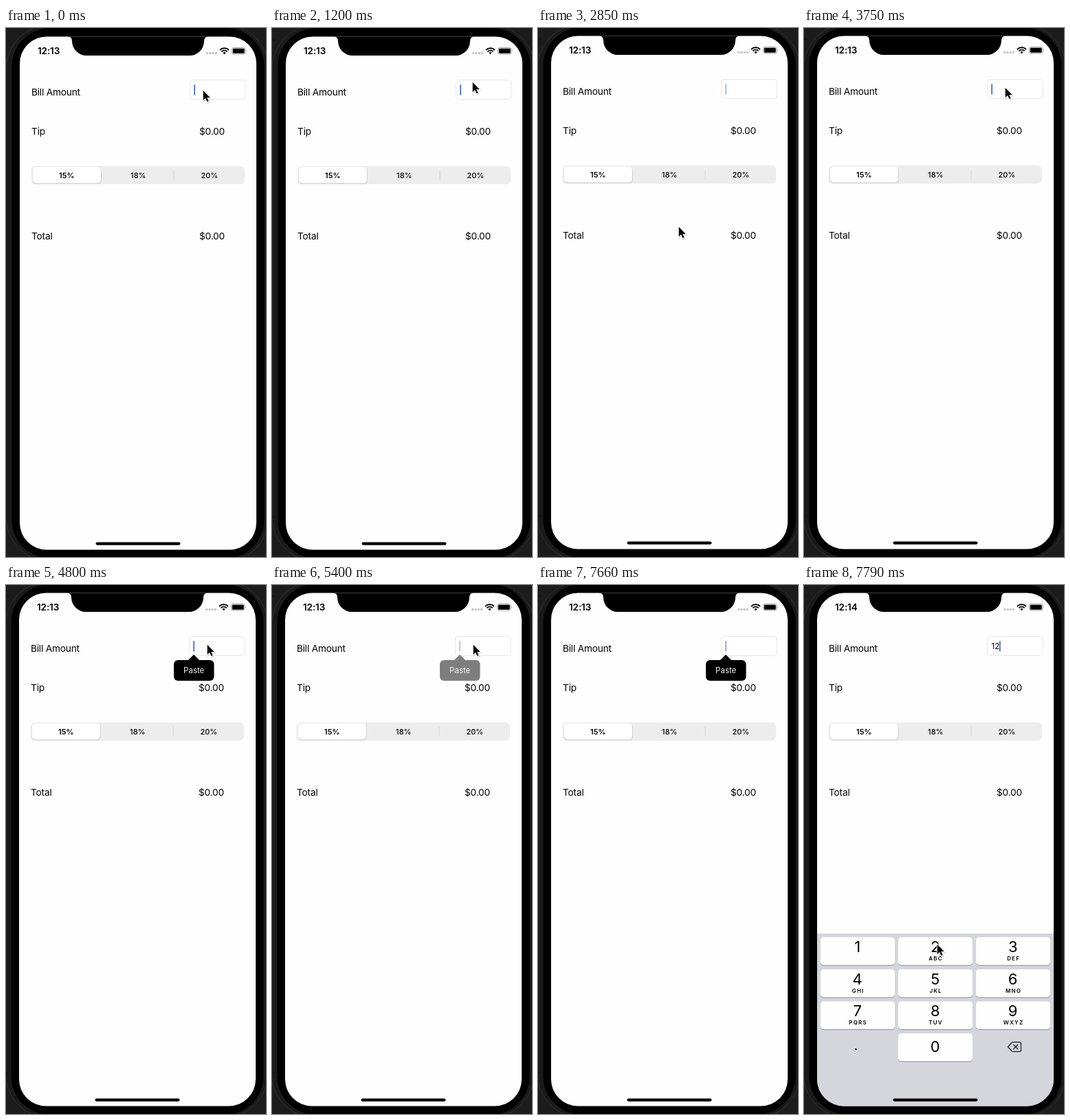
An HTML page for the animation above (8 s loop, 378 by 768 pixels).

```html
<!DOCTYPE html>
<html lang="en">
<head>
<meta charset="utf-8">
<title>Tip calculator</title>
<style>
  html, body { margin: 0; width: 100%; height: 100%; overflow: hidden; background: #1c1c1c; }
  svg { display: block; width: 378px; height: 768px; }
  text { font: 13.7px Inter, Roboto, sans-serif; letter-spacing: -.2px; }
  .mid { text-anchor: middle; }
  text.time { font-size: 13.5px; font-weight: 600; letter-spacing: -.1px; }
  text.seg { font-size: 11px; font-weight: 500; letter-spacing: 0; }
  text.small { font-size: 11.5px; letter-spacing: 0; }
  text.digit { font-size: 22px; letter-spacing: 0; }
  text.letters { font-size: 8px; font-weight: 600; letter-spacing: 1.2px; }
</style>
</head>
<body>
<svg viewBox="0 0 378 768">
  <defs>
    <clipPath id="screen"><rect x="19" y="11.5" width="344" height="745" rx="39"/></clipPath>
  </defs>
  <rect width="378" height="768" fill="#1c1c1c"/>
  <g id="phone">
    <rect x="-1" y="-6" width="382" height="780" rx="66" fill="#1a1a1a" stroke="#303030"/>
    <path d="M-1 16.500H4M-1 708.500H4" stroke="#101010"/>
    <rect x="7.500" y="-1" width="367" height="770" rx="56"/>
    <g clip-path="url(#screen)">
      <rect x="19" y="11" width="344" height="746" fill="#fefefe"/>
      <path d="M88 11q7 .5 7 7a21 21 0 0 0 21 21H266a21 21 0 0 0 21-21q0-6.500 7-7Z"/>

      <text id="clock" class="time" x="45" y="37">12:13</text>
      <path d="M290.300 35.500H306" stroke="#c6c6c8" stroke-width="3" stroke-dasharray="3 1.200"/>
      <g fill="none" stroke="#000" stroke-width="1.900">
        <path d="M310 31a9.200 9.200 0 0 1 13 0M312.300 33.400a5.900 5.900 0 0 1 8.400 0"/>
      </g>
      <path d="M316.500 37.300l-2.200-2.300a3.100 3.100 0 0 1 4.400 0Z"/>
      <rect x="327.500" y="27.500" width="19.500" height="9.500" rx="2.500" fill="none" stroke="#a0a0a0"/>
      <rect x="328.800" y="28.800" width="16.900" height="6.900" rx="1.300"/>
      <path d="M348 30.700q1.600 1.500 0 3.200Z" fill="#a0a0a0"/>

      <text x="36" y="97">Bill Amount</text>
      <text x="36" y="153.500">Tip</text>
      <text x="36" y="305.500">Total</text>
      <text x="280" y="153.500">$0.00</text>
      <text x="280" y="305.500">$0.00</text>
      <rect x="266.500" y="74.500" width="80.500" height="28" rx="4" fill="#fff" stroke="#e8e8e8"/>

      <rect x="35.500" y="199.500" width="310.500" height="26.500" rx="6.500" fill="#ededee"/>
      <rect x="37" y="201.500" width="101" height="24" rx="5.500" fill="#cfcfd0"/>
      <rect x="37.500" y="201" width="99.500" height="23.200" rx="5.300" fill="#fff"/>
      <path d="M243 206v14" stroke="#d6d6d8"/>
      <text class="seg mid" x="87.300" y="216.500" style="font-weight:600">15%</text>
      <text class="seg mid" x="191.300" y="216.500">18%</text>
      <text class="seg mid" x="294.800" y="216.500">20%</text>

      <g id="keyboard"><rect x="19" y="506" width="344" height="251" fill="#d5d6db"/></g>
      <rect x="129.500" y="745.500" width="123" height="4.200" rx="2.100"/>
    </g>
    <text id="amount" class="small" x="272.500" y="93">12</text>
    <rect id="caret" y="81" width="1.700" height="15.800" rx=".8" fill="#3f69d6"/>
    <g id="popup">
      <path d="M264.500 109.500L273 101l8.500 8.500Z"/>
      <rect x="244" y="109" width="58.500" height="30" rx="6"/>
      <text class="small mid" x="273.200" y="128" fill="#eee">Paste</text>
    </g>
  </g>
  <g id="pointer">
    <path d="M0 0V14.200l3.300-3.100 2.400 5.200 2.200-1-2.400-5.100H10Z" transform="translate(.8 1.400)" stroke="#000" stroke-width="2" opacity=".15"/>
    <path d="M0 0V14.200l3.300-3.100 2.400 5.200 2.200-1-2.400-5.100H10Z" stroke="#fff" stroke-width="1.800" paint-order="stroke"/>
  </g>
</svg>
<script>
const $ = id => document.getElementById(id);
const LOOP = 8000, STEP = 150, SHIFT = 1650, TYPED = 7790;

// Number pad
const letters = ['', 'ABC', 'DEF', 'GHI', 'JKL', 'MNO', 'PQRS', 'TUV', 'WXYZ'];
function key(col, row, digit, label, drop) {
  const x = 24 + col * 113, y = 511.3 + row * 46.6;
  return `<rect x="${x}" y="${y + 1}" width="108" height="40.500" rx="4.500" fill="#8d8e92"/>
    <rect x="${x}" y="${y}" width="108" height="40.500" rx="4.500" fill="#fefefe"/>
    <text class="digit mid" x="${x + 53.7}" y="${y + drop}">${digit}</text>
    <text class="letters mid" x="${x + 54.6}" y="${y + 33.7}">${label}</text>`;
}
$('keyboard').insertAdjacentHTML('beforeend',
  letters.map((label, i) => key(i % 3, Math.floor(i / 3), i + 1, label, 21.7)).join('') +
  key(1, 3, 0, '', 27.3) +
  `<circle cx="75.300" cy="674" r="1.300"/>
   <g fill="none" stroke="#222" stroke-width="1.300" stroke-linejoin="round" stroke-linecap="round">
     <path d="M296.500 670.500l5.500-6q.7-.8 1.700-.8H313.500q2 0 2 2v9.600q0 2-2 2H303.700q-1 0-1.700-.8Z"/>
     <path d="M304.700 667.500l6 6m0-6l-6 6"/>
   </g>`);

// Tracks: [start, value]; each value holds until the next start
const blink = t => [[t, .4], [t + 150, 0], [t + 300, .5], [t + 450, 1]];
const caretTrack = [[0, 1], ...[600, 1650, 2550].flatMap(blink),
  [4500, 0], [4800, 1], ...blink(5400),
  [6450, .4], [6600, 0], [6750, 1], [7350, 0], [7660, .65], [TYPED, 1]];
const popupTrack = [[0, 0], [4350, .5], [4500, 1], [4950, .5], [5100, 0],
  [5400, .5], [5550, 1], [TYPED, 0]];
const held = (track, t) => track.findLast(([start]) => start <= t)[1];

// Pointer strokes: [time, x, y]; the pointer is away between strokes
const strokes = [
  [[0, 286, 90], [1050, 286, 90], [1200, 291, 78], [1350, 301, 40], [1500, 311, 2], [1600, 313, -10]],
  [[2550, 310, 10], [2700, 275, 118], [2850, 204, 288], [3000, 171, 359],
   [3150, 171, 359], [3300, 180, 335], [3450, 235, 205], [3600, 284, 98], [3750, 292, 86],
   [5850, 292, 86], [6000, 298, 200], [6150, 310, 510], [6300, 319, 738], [6550, 320, 740]],
  [[TYPED, 193, 521], [LOOP, 193, 521]]
];
function pointerAt(t) {
  const path = strokes.find(s => t >= s[0][0] && t <= s.at(-1)[0]);
  if (!path) return null;
  const i = Math.max(1, path.findIndex(p => p[0] >= t));
  const [t0, x0, y0] = path[i - 1], [t1, x1, y1] = path[i];
  const k = (t - t0) / (t1 - t0);
  return [x0 + (x1 - x0) * k, y0 + (y1 - y0) * k];
}

const show = (id, on) => $(id).style.display = on ? '' : 'none';

function draw(now) {
  const t = now % LOOP, typed = t >= TYPED;
  const offset = t < SHIFT ? 1 : 0;
  $('phone').setAttribute('transform', `translate(${offset} ${offset})`);
  $('clock').textContent = typed ? '12:14' : '12:13';
  show('keyboard', typed);
  show('amount', typed);
  $('caret').setAttribute('x', typed ? 284 : 272.3);
  $('caret').setAttribute('opacity', held(caretTrack, t));
  $('popup').setAttribute('opacity', held(popupTrack, t));
  const p = pointerAt(typed ? t : Math.floor(t / STEP) * STEP);
  show('pointer', p);
  if (p) $('pointer').setAttribute('transform', `translate(${p[0] + .7} ${p[1] + .7})`);
}

const start = performance.now();
function tick() {
  draw(performance.now() - start);
  requestAnimationFrame(tick);
}
tick();
</script>
</body>
</html>
```
